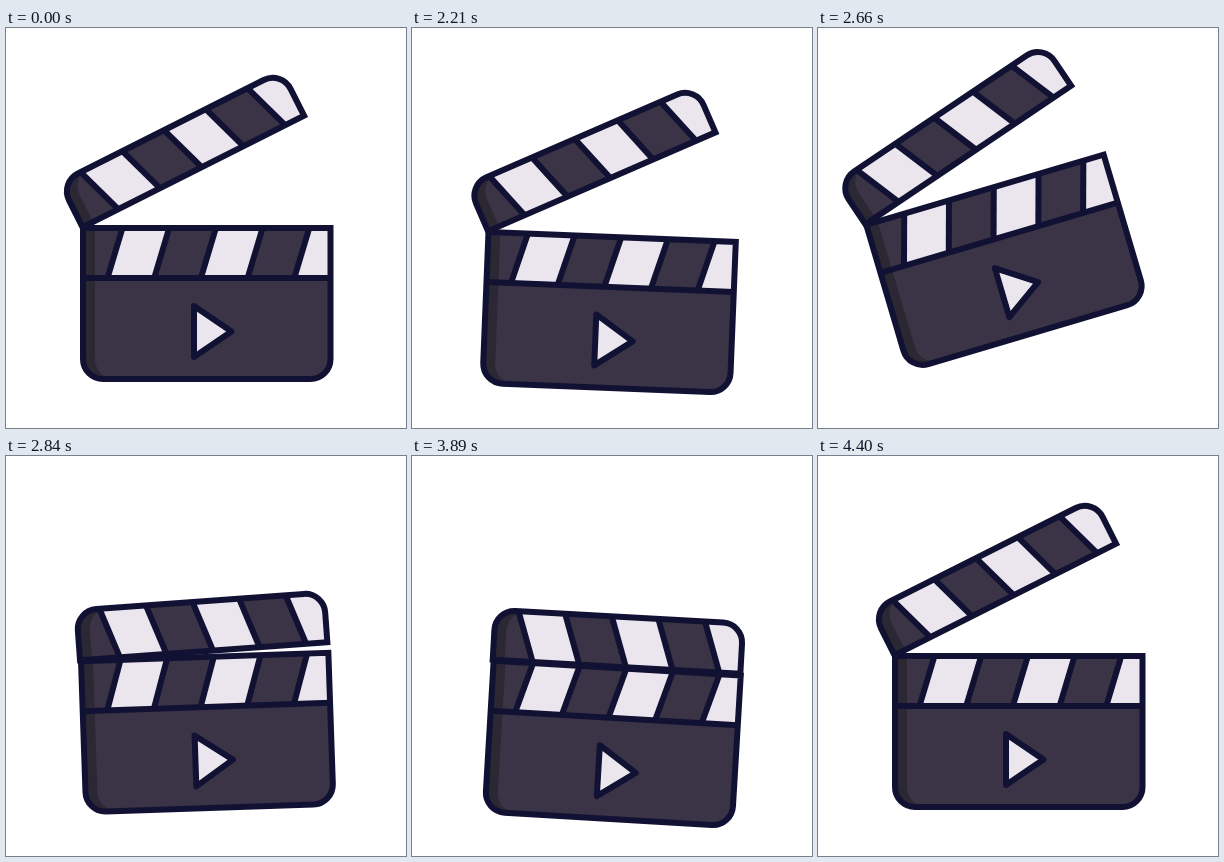
These frames come from a looping animation (400x400 px, 4.43 s). An HTML page with a canvas:

```html
<!DOCTYPE html>
<html lang="en">
<head>
<meta charset="utf-8">
<title>Clapperboard</title>
<style>
  html, body { margin: 0; width: 100%; height: 100%; overflow: hidden; background: #fff; }
  canvas { display: block; width: 400px; height: 400px; }
</style>
</head>
<body>
<canvas id="stage"></canvas>
<script>
const LOOP = 4430, STEP = 30, OFFSET = 20;
const LINE = '#111233', DARK = '#3b3447', SHADE = '#2b2833', LIGHT = '#ebe6ee';
const CENTER = { x: 201, y: 275 };
const HINGE = { x: 76.5, y: 198 };
const OPEN = 26.7;

// Each track is a list of [time, value] keys, eased in and out between keys.
const tracks = {
  x: [[2000, 0], [2150, -3], [2590, -15], [2870, 1], [3100, 0]],
  y: [[2000, 0], [2150, 12], [2590, -48], [2920, 9.5], [3100, 0],
      [3600, 0], [3890, 12], [4145, 0]],
  turn: [[2000, 0], [2150, 3.4], [2590, -18.5], [2970, 4.2], [3100, 0],
         [3600, 0], [3890, 3.4], [4145, 0]],
  arm: [[2000, OPEN], [2150, OPEN], [2360, 22], [2590, 20], [2905, 0], [3110, 1.6], [3330, 0],
        [3880, 0], [4120, 35.5], [4400, OPEN]]
};

const canvas = document.getElementById('stage');
const ctx = canvas.getContext('2d');
const ratio = window.devicePixelRatio || 1;
canvas.width = canvas.height = 400 * ratio;

function valueAt(keys, time) {
  if (time <= keys[0][0]) return keys[0][1];
  for (let i = 1; i < keys.length; i++) {
    const [t0, v0] = keys[i - 1], [t1, v1] = keys[i];
    if (time < t1) {
      const u = (time - t0) / (t1 - t0);
      return v0 + (v1 - v0) * u * u * (3 - 2 * u);
    }
  }
  return keys[keys.length - 1][1];
}

function rotateAbout(point, degrees) {
  ctx.translate(point.x, point.y);
  ctx.rotate(degrees * Math.PI / 180);
  ctx.translate(-point.x, -point.y);
}

function polygon(points) {
  ctx.beginPath();
  points.forEach(([x, y]) => ctx.lineTo(x, y));
  ctx.closePath();
}

function line(x0, y0, x1, y1) {
  ctx.beginPath();
  ctx.moveTo(x0, y0);
  ctx.lineTo(x1, y1);
  ctx.stroke();
}

// A dark panel with a shaded left edge, slanted stripes and an outline.
function panel({ x, y, w, h, radii, stripeTop, stripeBottom, slant, firstStripe }) {
  const outline = shift => {
    ctx.beginPath();
    ctx.roundRect(x + shift, y, w, h, radii);
  };
  ctx.save();
  outline(0);
  ctx.clip();
  ctx.fillStyle = SHADE;
  ctx.fillRect(x, y, w, h);
  outline(12);
  ctx.fillStyle = DARK;
  ctx.fill();

  const edge = i => firstStripe + i * 46.7;
  ctx.fillStyle = LIGHT;
  for (let i = 0; i < 6; i += 2) {
    polygon([[edge(i), stripeTop], [edge(i + 1), stripeTop],
             [edge(i + 1) + slant, stripeBottom], [edge(i) + slant, stripeBottom]]);
    ctx.fill();
  }
  for (let i = 0; i < 5; i++) line(edge(i), stripeTop, edge(i) + slant, stripeBottom);
  ctx.restore();
  outline(0);
  ctx.stroke();
}

function drawBoard() {
  panel({ x: 77, y: 200, w: 247.5, h: 151, radii: [0, 0, 20, 20],
          stripeTop: 200, stripeBottom: 250, slant: -15, firstStripe: 116.5 });
  line(77, 250, 324.5, 250);
  polygon([[188, 278], [225.5, 303.5], [188, 329]]);
  ctx.fillStyle = LIGHT;
  ctx.fill();
  ctx.lineJoin = 'round';
  ctx.stroke();
  ctx.lineJoin = 'miter';
}

function drawArm(angle) {
  ctx.save();
  rotateAbout(HINGE, -angle);
  panel({ x: 76, y: 149, w: 248, h: 50, radii: [20, 20, 0, 0],
          stripeTop: 149, stripeBottom: 199, slant: 17, firstStripe: 99 });
  ctx.restore();
}

function draw(time) {
  const pose = name => valueAt(tracks[name], time);
  ctx.setTransform(ratio, 0, 0, ratio, 0, 0);
  ctx.fillStyle = '#fff';
  ctx.fillRect(0, 0, 400, 400);
  ctx.strokeStyle = LINE;
  ctx.lineWidth = 6;
  ctx.translate(pose('x'), pose('y'));
  rotateAbout(CENTER, pose('turn'));
  drawBoard();
  drawArm(pose('arm'));
}

const start = performance.now();

function tick() {
  const time = (performance.now() - start) % LOOP;
  draw(Math.floor((time - OFFSET) / STEP) * STEP + OFFSET);
  requestAnimationFrame(tick);
}
tick();
</script>
</body>
</html>
```
